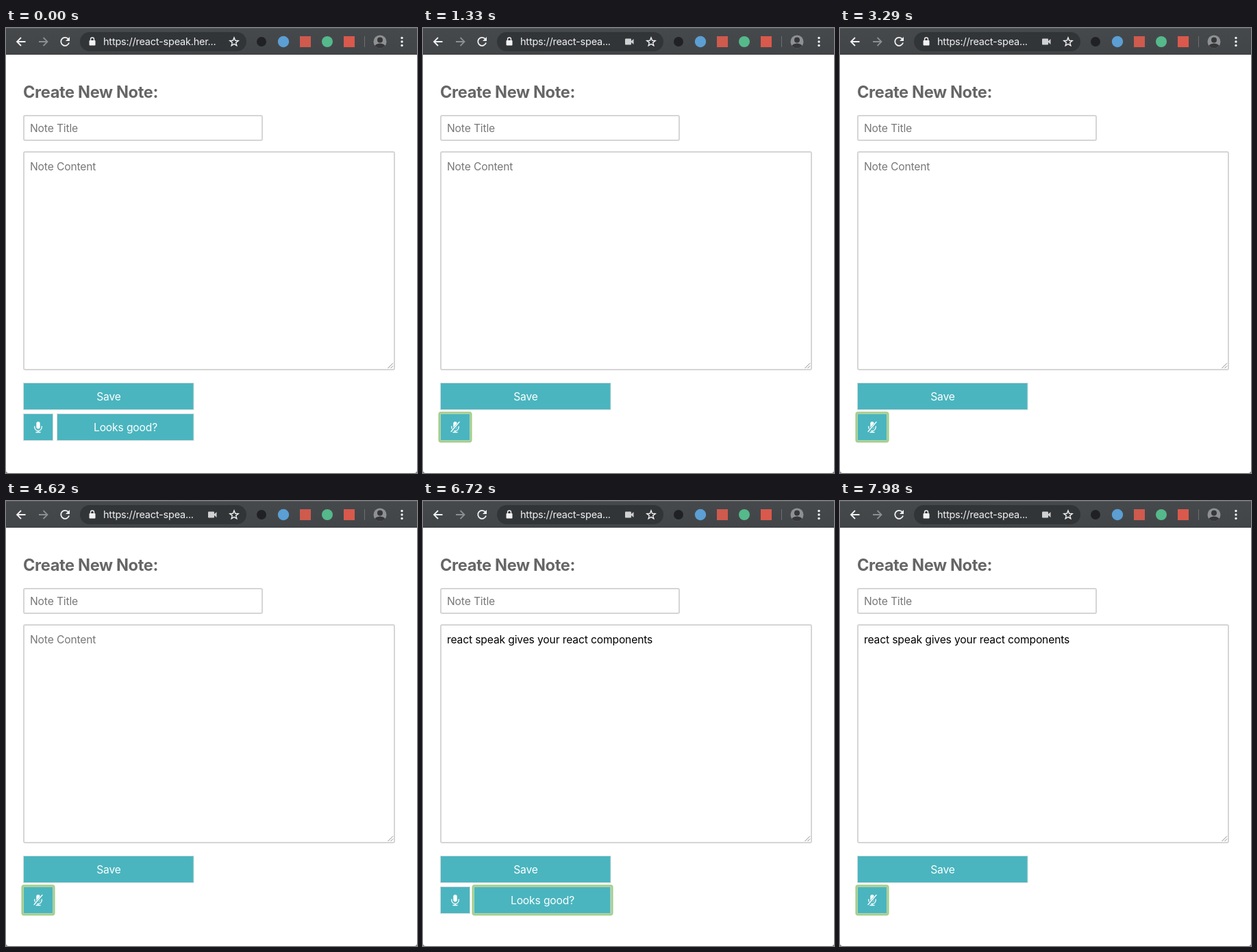
These frames come from a looping animation (600 by 650 pixels, 8 s). An HTML page:

```html
<!DOCTYPE html>
<html lang="en">
<head>
<meta charset="utf-8">
<title>Voice note form</title>
<style>
  html, body { margin: 0; width: 100%; height: 100%; overflow: hidden; background: #fff; }
  svg { display: block; width: 600px; height: 650px; }
  text { font: 15.6px Inter, "Liberation Sans", sans-serif; letter-spacing: -.008em; fill: #000; }
  .title { font-size: 23.6px; font-weight: 700; letter-spacing: -.015em; fill: #666; }
  .hint { fill: #777; }
  .url { font-size: 14.5px; letter-spacing: -.015em; fill: #f1f1f2; }
  .label { fill: #fff; text-anchor: middle; }
  .button { fill: #4ab5bf; stroke: #d3dcdd; }
  .field { fill: #fff; stroke: #d5d5d5; stroke-width: 2; }
  .line { fill: none; stroke: #f1f1f2; stroke-width: 1.8; }
  .thin { fill: none; stroke: #fff; stroke-width: 1.3; stroke-linecap: round; }
  .light { fill: #f1f1f2; }
</style>
</head>
<body>
<svg viewBox="0 0 600 650">
  <defs>
    <linearGradient id="barFill" x2="0" y2="1">
      <stop stop-color="#46494c"/><stop offset="1" stop-color="#424548"/>
    </linearGradient>
    <clipPath id="face"><circle cx="546" cy="20" r="9.5"/></clipPath>
    <g id="mic">
      <rect x="44.3" y="575" width="5.4" height="10.5" rx="2.7" fill="#fff"/>
      <path class="thin" d="M41.8 582v1.2a5.2 5.2 0 0 0 10.4 0V582M47 588.5v2M44 590.5h6"/>
    </g>
  </defs>

  <!-- browser bar -->
  <rect width="600" height="39" fill="url(#barFill)"/>
  <path d="M0 .5h600" stroke="#56595c"/>
  <path d="M0 38.5h600" stroke="#3b3d40"/>
  <path class="line" d="M28.5 20H16.5M22 14l-6 6 6 6"/>
  <path class="line" d="M48 20h12M54.5 14l6 6-6 6" style="stroke:#8c8e91"/>
  <path class="line" d="M91 16.2A6 6 0 1 0 92 21.5"/>
  <path class="light" d="M93 13v6h-6z"/>
  <rect x="108" y="6" width="243" height="28" rx="14" fill="#323538"/>
  <rect class="light" x="121.5" y="18" width="9" height="7.5" rx="1"/>
  <path class="line" d="M123.5 18v-1.5a2.5 2.5 0 0 1 5 0V18" style="stroke-width:1.4"/>
  <text id="url" class="url" x="142" y="25"></text>
  <g id="camera" fill="#d0d1d2">
    <rect x="295" y="15.5" width="9" height="9" rx="1"/>
    <path d="M303 20l4.5-4v8z"/>
  </g>
  <path id="star" class="line" style="stroke-width:1.4"/>

  <!-- extensions and profile -->
  <circle cx="373" cy="20" r="7" fill="#202124"/>
  <circle cx="405" cy="20" r="8.2" fill="#5b9fd4"/>
  <rect x="429" y="12" width="16" height="16" fill="#cf5a4e"/>
  <circle cx="469" cy="20" r="8" fill="#55b98b"/>
  <rect x="493" y="12" width="16" height="16" fill="#d9594c"/>
  <path d="M523.5 12v16" stroke="#6c6e71"/>
  <g clip-path="url(#face)">
    <rect x="536" y="10" width="20" height="20" fill="#8e9092"/>
    <circle cx="546" cy="17.5" r="4" fill="#35373a"/>
    <ellipse cx="546" cy="28" rx="8" ry="5.5" fill="#35373a"/>
  </g>
  <g class="light">
    <circle cx="578" cy="14.5" r="1.7"/><circle cx="578" cy="20" r="1.7"/><circle cx="578" cy="25.5" r="1.7"/>
  </g>

  <!-- form -->
  <text class="title" x="25" y="102">Create New Note:</text>
  <rect class="field" x="26" y="128" width="348" height="36" rx="2"/>
  <text class="hint" x="35" y="152">Note Title</text>
  <rect class="field" x="26" y="181" width="541" height="318" rx="2"/>
  <path d="M557.5 497l7.5-7.5M561.5 497l3.5-3.5" stroke="#8a8a8a"/>
  <text id="content" x="35" y="208"></text>
  <rect class="button" x="25.5" y="518.5" width="248.5" height="39"/>
  <text class="label" x="150" y="544">Save</text>

  <rect class="button" x="25.5" y="563.5" width="43" height="39"/>
  <use id="micOn" href="#mic"/>
  <g id="micOff">
    <use href="#mic"/>
    <path d="M41.5 589.5L53 576.5" stroke="#4ab5bf" stroke-width="3.4"/>
    <path class="thin" d="M41 589.5L53 575.5"/>
  </g>
  <g id="confirm">
    <rect class="button" x="74.5" y="563.5" width="199.5" height="39"/>
    <text class="label" x="174.5" y="589">Looks good?</text>
  </g>
  <g id="ring" fill="none" stroke="#a3ce8b">
    <rect y="562" height="42" rx="2.5" stroke-width="4" stroke-opacity=".55"/>
    <rect y="562" height="42" rx="1.5" stroke-width="2"/>
  </g>
  <text id="speech" x="25" y="634">react speak gives your react components</text>

  <path d="M0 646v4h4a4 4 0 0 1-4-4M600 646v4h-4a4 4 0 0 0 4-4" fill="#777"/>
</svg>
<script>
const LOOP = 8000;
const $ = id => document.getElementById(id);
const show = (id, on) => $(id).style.display = on ? "" : "none";
const within = (t, from, to) => t >= from && t < to;

const points = Array.from({ length: 10 }, (_, i) => {
  const a = i * Math.PI / 5, r = i % 2 ? 2.8 : 6.5;
  return `${333 + r * Math.sin(a)} ${20.5 - r * Math.cos(a)}`;
});
$("star").setAttribute("d", `M${points.join("L")}Z`);

function placeRing(x, width) {
  for (const r of $("ring").children) {
    r.setAttribute("x", x);
    r.setAttribute("width", width);
  }
}

function draw(t) {
  const recording = within(t, 840, 5600) || t >= 7700;
  const accepted = t >= 6650;
  const onConfirm = within(t, 6580, 7630);

  show("camera", t >= 840);
  $("url").textContent = t < 840 ? "https://react-speak.her..." : "https://react-spea...";
  show("micOn", !recording);
  show("micOff", recording);
  show("confirm", !recording);
  show("speech", within(t, 5600, 6650));
  $("content").textContent = accepted ? $("speech").textContent : "Note Content";
  $("content").setAttribute("class", accepted ? "" : "hint");

  show("ring", t >= 770);
  placeRing(onConfirm ? 73 : 24, onConfirm ? 203 : 46);
}

function tick() {
  draw(performance.now() % LOOP);
  requestAnimationFrame(tick);
}
tick();
</script>
</body>
</html>
```
